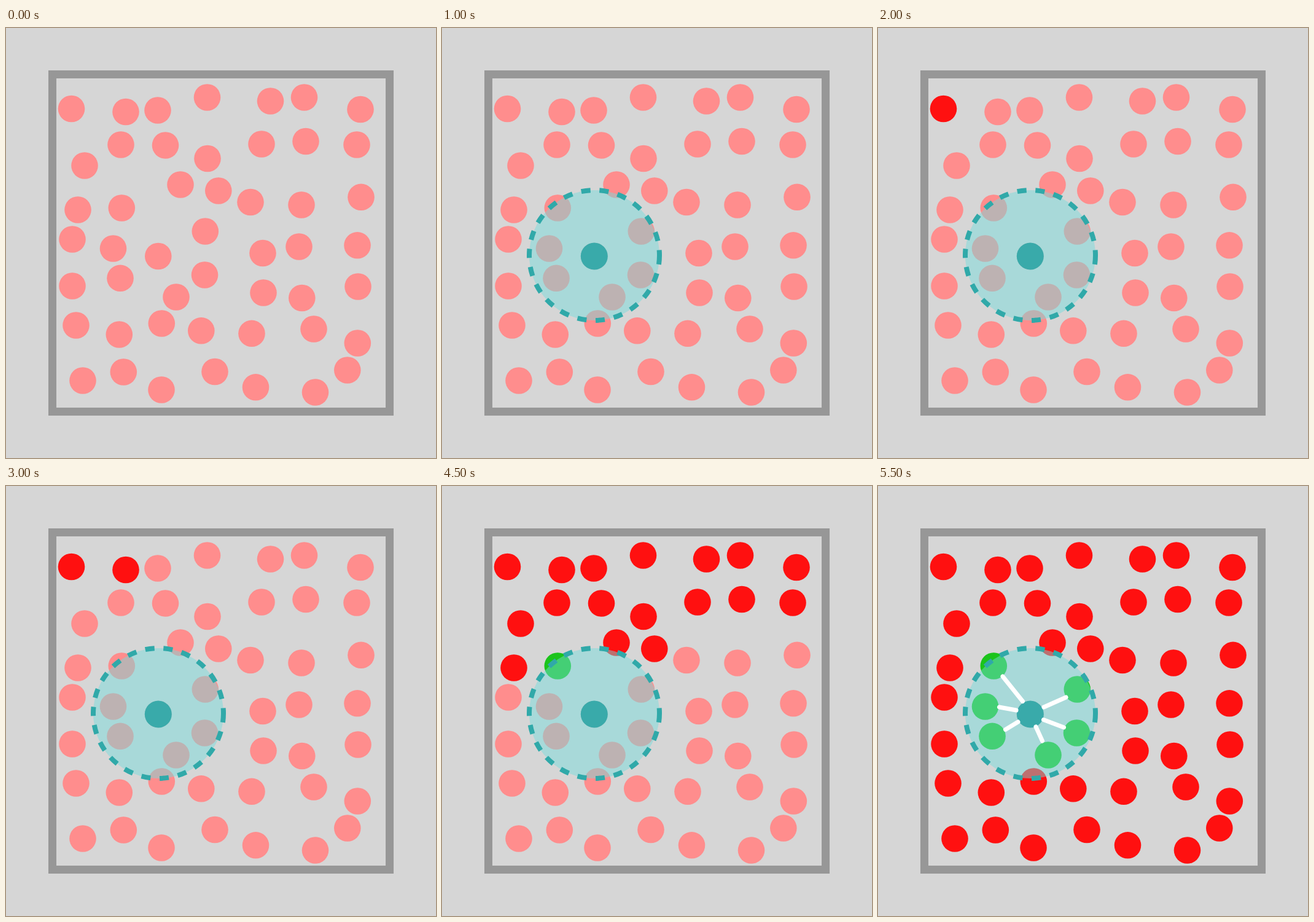
An HTML page for the animation above (6.5 s loop, 700 px wide and 700 px high).

```html
<!DOCTYPE html>
<html lang="en">
<head>
<meta charset="utf-8">
<title>Neighbour search</title>
<style>
  html, body { margin: 0; width: 100%; height: 100%; overflow: hidden; background: #d6d6d6; }
  svg { display: block; width: 100%; height: 100%; }
</style>
</head>
<body>
<svg id="stage" viewBox="0 0 700 700">
  <rect x="75.5" y="75.5" width="549" height="549" fill="none" stroke="#979797" stroke-width="13"/>
  <g id="dots"></g>
  <g id="range">
    <circle cx="248" cy="370" r="106" fill="#74dcdb" fill-opacity=".47"/>
    <circle cx="248" cy="370" r="106" fill="none" stroke="#30a9a9" stroke-width="8" stroke-dasharray="15 14.85"/>
  </g>
  <circle id="center" cx="247.8" cy="371.5" r="22" fill="#39aaaa"/>
  <g id="links" stroke="#fff" stroke-width="7" stroke-linecap="round"></g>
</svg>
<script>
const LOOP = 6500, STEP = 500;
const PINK = '#ff8d8d', RED = '#ff1010', GREEN = '#1bc41b', CHECK = '#ffb010';

// Dots in the order they are examined
const far = [
  [106.5, 131.5], [195, 136.5], [247, 134], [327.5, 113], [430.5, 119], [485.5, 113],
  [577, 132.5], [187, 190], [259.5, 191], [328, 212.5], [416, 189], [488, 184.5],
  [571, 190], [128, 224], [284, 255], [345.8, 265], [117, 296]
];
const later = [
  [398, 283.5], [481, 288], [578, 275.3], [108, 344], [418, 366.5], [477, 356],
  [572, 353.8], [108, 420], [419, 431], [481.8, 439.5], [573, 421], [114, 484],
  [184.3, 499], [253.3, 481], [317.8, 492.8], [400, 497.3], [501, 490], [572.3, 513],
  [125, 574], [191.3, 560], [253, 589], [340, 559.5], [406.5, 584.8], [503.5, 593],
  [555.8, 557]
];
const near = [
  [188.3, 293], [324.3, 331], [174.5, 359], [186, 407.3], [323.5, 402], [277, 438]
];
const links = [
  [203, 310, 235.5, 350.5], [197.5, 360, 225, 365], [207.5, 396.5, 228, 384],
  [257, 392, 267.5, 415], [269.5, 380.5, 302.5, 393], [270, 360, 306, 344]
];

const el = id => document.getElementById(id);

function add(parent, tag, attrs) {
  const node = document.createElementNS('http://www.w3.org/2000/svg', tag);
  for (const name in attrs) node.setAttribute(name, attrs[name]);
  return el(parent).appendChild(node);
}

const dot = ([cx, cy]) => add('dots', 'circle', { cx, cy, r: 21.8, fill: PINK });
const farDots = far.map(dot);
const laterDots = later.map(dot);
const nearDots = near.map(dot);
dot([247.8, 371.5]);
links.forEach(([x1, y1, x2, y2]) => add('links', 'line', { x1, y1, x2, y2 }));

const paint = (node, color) => node.setAttribute('fill', color);
const show = (id, on) => el(id).setAttribute('visibility', on ? 'visible' : 'hidden');

// Pink until checked, then the final colour from step `done` on
const colorAt = (step, check, done, final) =>
  step >= done ? final : step >= check ? CHECK : PINK;

function draw(step) {
  show('center', step >= 1);
  show('range', step >= 2);
  farDots.forEach((node, i) => {
    const [check, done] = [[3, 4], [5, 6]][i] || [7, 7];
    paint(node, colorAt(step, check, done, RED));
  });
  nearDots.forEach((node, i) => {
    const [check, done] = i ? [10, 10] : [8, 9];
    paint(node, colorAt(step, check, done, GREEN));
  });
  laterDots.forEach(node => paint(node, colorAt(step, 10, 10, RED)));
  show('links', step >= 11);
}

const start = performance.now();
let last = -1;

function tick() {
  const step = Math.floor((performance.now() - start) % LOOP / STEP);
  if (step !== last) draw(last = step);
  requestAnimationFrame(tick);
}
tick();
</script>
</body>
</html>
```
